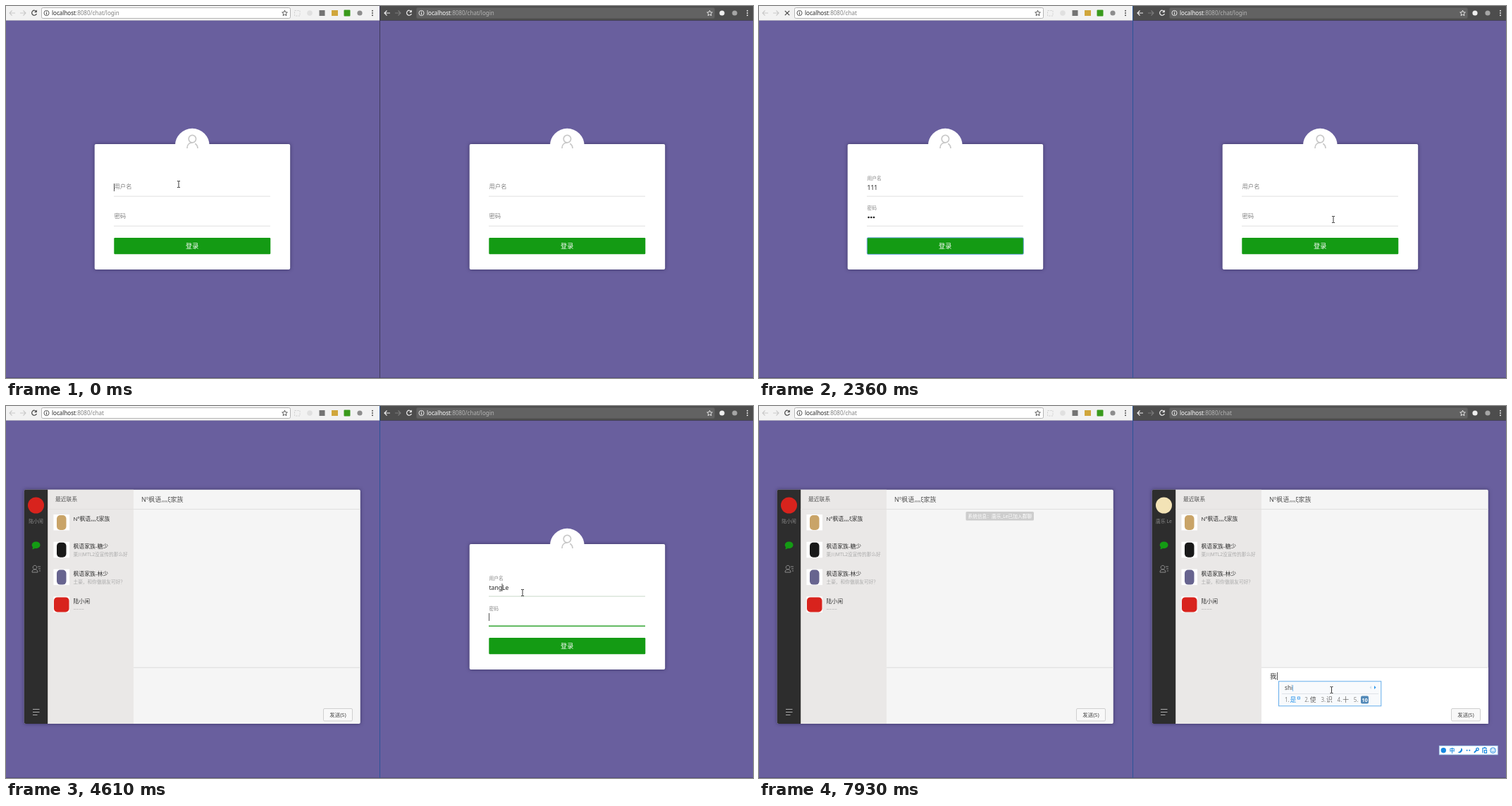
An HTML page for the animation above (8 s loop, 1060x528 px).

```html
<!DOCTYPE html>
<html lang="zh-CN">
<head>
<meta charset="utf-8">
<title>Chat login</title>
<style>
html, body { margin: 0; width: 100%; height: 100%; overflow: hidden; background: #695f9e; }
svg { display: block; width: 1060px; height: 528px; }
text { font-family: "Noto Sans", "Noto Sans CJK SC", "Noto Sans CJK", sans-serif; white-space: pre; }
.lift { filter: drop-shadow(0 0 2.5px rgba(10, 5, 40, .5)); }
</style>
</head>
<body>
<svg id="stage" viewBox="0 0 1060 528"></svg>
<script>
const LOOP = 8000, RIGHT = 532, FADE = 250;
const LEFT_IN = 2460, RIGHT_IN = 6380;
const stage = document.getElementById('stage');
const updates = [];

// --- drawing helpers ---
function add(parent, tag, attrs = {}) {
  const el = document.createElementNS('http://www.w3.org/2000/svg', tag);
  for (const k in attrs) el.setAttribute(k, attrs[k]);
  parent.append(el);
  return el;
}
const group = (p, x = 0, y = 0, attrs = {}) =>
  add(p, 'g', { transform: `translate(${x} ${y})`, ...attrs });
const rect = (p, x, y, width, height, fill, attrs = {}) =>
  add(p, 'rect', { x, y, width, height, fill, ...attrs });
const dot = (p, cx, cy, r, fill, attrs = {}) => add(p, 'circle', { cx, cy, r, fill, ...attrs });
const line = (p, d, stroke, width = 1, attrs = {}) =>
  add(p, 'path', { d, stroke, 'stroke-width': width, fill: 'none', ...attrs });
// y is the middle of the line of text
function label(p, x, y, size, str, fill, attrs = {}) {
  const el = add(p, 'text', { x, y: y + size * .37, 'font-size': size, fill, ...attrs });
  el.textContent = str;
  return el;
}

// --- timing helpers ---
const ease = p => { p = Math.min(1, Math.max(0, p)); return 1 - (1 - p) ** 2.6; };
const at = (steps, t) => steps.reduce((v, s) => s[0] <= t ? s[1] : v, steps[0][1]);
function show(el, ...spans) {
  updates.push(t => {
    el.style.display = spans.some(([a, b = LOOP]) => t >= a && t < b) ? '' : 'none';
  });
  return el;
}
function typed(el, steps) {
  updates.push(t => {
    const s = at(steps, t);
    if (el.textContent !== s) el.textContent = s;
  });
}
function caret(p, y, steps, from, to, color = '#555') {
  const el = show(rect(p, 0, y, 1, 11, color), [from, to]);
  updates.push(t => el.setAttribute('x', at(steps, t)));
}

// --- browser bar ---
function browser(dx, dark, loadFrom, loadTo) {
  const g = group(stage, dx);
  const ink = dark ? '#f2f2f2' : '#444', faint = dark ? '#7c7c7c' : '#c9c9c9';
  rect(g, dark ? -1 : 0, 0, 530, 20, dark ? '#4d4d4d' : '#f2f2f2');
  rect(g, dark ? -1 : 0, 20, 530, 1, dark ? '#45415c' : '#aaa6bb');
  rect(g, 50.5, 2.5, dark ? 423 : 353, 15, dark ? '#626262' : '#fff',
    { rx: 2, stroke: dark ? '#5a5a5a' : '#b4b4b4' });
  line(g, 'M13 10H5M8.5 6.5L5 10l3.5 3.5', dark ? ink : faint, 1.1);
  line(g, 'M20 10h8M24.5 6.5L28 10l-3.5 3.5', faint, 1.1);
  const reload = group(g);
  line(reload, 'M43 7.7A3.5 3.5 0 1 0 43.4 11', ink, 1.2);
  line(reload, 'M43.6 5.8V9h-3.2z', ink, .3, { fill: ink });
  show(reload, [0, loadFrom], [loadTo]);
  show(line(g, 'M36.8 6.8l6.4 6.4M43.2 6.8l-6.4 6.4', ink, 1.2), [loadFrom, loadTo]);
  dot(g, 57.5, 10, 3.6, 'none', { stroke: ink, 'stroke-width': .9 });
  line(g, 'M57.5 7.7v1M57.5 9.5v2.8', ink, 1);
  const url = label(g, 65, 10, 8.05, '', dark ? '#fff' : '#222');
  add(url, 'tspan').textContent = 'localhost';
  const path = add(url, 'tspan', { fill: dark ? '#b4b4b4' : '#808080' });
  typed(path, [[0, ':8080/chat/login'], [loadFrom, ':8080/chat']]);
  const star = group(g, dark ? 466.5 : 395.5, 10);
  line(star, 'M0-3.8L1.1-1.2 3.8-1 1.8.9 2.4 3.6 0 2.2-2.4 3.6-1.8.9-3.8-1-1.1-1.2z', ink, .9);
  if (dark) {
    dot(g, 484, 10, 3.6, '#eee');
    dot(g, 502, 10, 3.6, '#a5a5a5');
  } else {
    rect(g, 409.5, 6.5, 7.5, 7.5, 'none', { stroke: '#d4d4d4', 'stroke-dasharray': '2.5 1.2' });
    dot(g, 431, 10, 3.8, '#e0e0e0');
    rect(g, 444.5, 6, 8, 8, '#747474');
    rect(g, 462, 6, 9, 8, '#d0a63c');
    rect(g, 479.5, 5.5, 9, 9, '#3a9a1c', { rx: 1 });
    dot(g, 502, 10, 3.6, '#8d8d8d');
  }
  [6.7, 10, 13.3].forEach(y => dot(g, 520, y, .95, ink));
}

// --- login form ---
function field(g, y, name, focus, blur) {
  const text = label(g, 0, 0, 8.4, name, '#858585');
  rect(g, 153, y + 14, 222, 1, '#e0e0e0');
  const bar = rect(g, 153, y + 13.8, 222, 1.5, '#149b14');
  updates.push(t => {
    const p = ease((t - focus) / FADE), k = 1 - ease((t - focus) / FADE * 2) * .2;
    text.setAttribute('transform', `translate(153.5 ${y - 11.5 * p}) scale(${k})`);
    bar.setAttribute('opacity', p * p * (1 - ease((t - blur) / FADE)));
  });
}
function login(dx, opt) {
  const g = group(stage, dx);
  show(g, [0, opt.leave]);
  rect(g, 125.7, 196, 277.5, 178, '#fff', { rx: 2, class: 'lift' });
  dot(g, 264.3, 198.2, 24.4, '#fff');
  dot(g, 264.4, 188.6, 5.2, 'none', { stroke: '#c8c8c8', 'stroke-width': 1.7 });
  line(g, 'M257 202C257 197 260 194 264.5 194M268.3 195.3C271 197 272 199 272 202', '#c8c8c8', 1.7);
  field(g, 255.6, '用户名', opt.userFocus, opt.passFocus);
  field(g, 297.8, '密码', opt.passFocus, opt.click);
  typed(label(g, 153.5, 258, 8.6, '', '#222'), opt.user);
  for (let i = 0; i < 3; i++)
    show(dot(g, 155.6 + i * 3.7, 300, 1.35, '#222'), [opt.dots[i]]);
  caret(g, 252, opt.userCaret, ...opt.userCaretOn);
  caret(g, 294, opt.passCaret, opt.passFocus, opt.passCaretOff);
  rect(g, 153.3, 329, 222, 23.2, '#149b14', { rx: 1.2 });
  show(rect(g, 153.3, 328.8, 222, 23.6, 'none', { rx: 1.5, stroke: '#6ea6df' }), [opt.click]);
  label(g, 264.2, 341, 9.1, '登录', '#fff', { 'text-anchor': 'middle' });
}

// --- chat window ---
const GROUP = 'Nº枫语灬ξ家族';
const ROWS = [
  [GROUP, '', '#c9a468'],
  ['枫语家族-糖少', '栗川MTL2没宣传的那么好', '#191919'],
  ['枫语家族-林少', '土豪，和你做朋友可好？', '#67648f'],
  ['陆小闲', '~~~~', '#d8231d']
];
function chat(dx, name, color, from, active) {
  const g = show(group(stage, dx), [from]);
  rect(g, 25.8, 118.8, 477, 332.2, '#f5f5f5', { rx: 2, class: 'lift' });
  rect(g, 25.8, 118.8, 35, 332.2, '#2d2d2d', { rx: 2 });
  rect(g, 59.2, 118.8, 121.8, 332.2, '#eae8e7');
  dot(g, 42.5, 141, 11.5, color);
  label(g, 42.5, 163.8, 6.8, name, '#8c8c8c', { 'text-anchor': 'middle' });
  add(g, 'ellipse', { cx: 42.6, cy: 197.3, rx: 5.9, ry: 4.9, fill: '#149b14' });
  line(g, 'M38 200l-.5 3.5 4-1.5z', 'none', 0, { fill: '#149b14' });
  line(g, 'M41 226.3a2.8 2.8 0 1 1-.1 0M37 236c0-3 1.7-4 4-4s4 1 4 4zM45 228h4M46 231h3M47 234h2', '#8c8c8c', 1);
  line(g, 'M38 430.5h9.5M38 434.5h9.5M38 438.5h6.5', '#aaa');
  label(g, 70, 132.2, 7.8, '最近联系', '#555');
  label(g, 192, 132.5, 9, GROUP, '#555');
  rect(g, 59.2, 146, 122, 1, '#e2e0df');
  rect(g, 181, 146, 322, 1, '#e0e0e0');
  ROWS.forEach(([who, last, tint], i) => {
    const y = 160.5 + i * 38.8, wide = i === 3;
    rect(g, 67.5, y - 6.5, 22.5, 22.5, '#fff');
    rect(g, wide ? 68 : 72, y - 5.5, wide ? 21.5 : 13.5, 21, tint, { rx: 5 });
    label(g, 95.5, y, 7.85, who, '#333');
    label(g, 95.5, y + 11.5, 6.7, last, '#aaa');
  });
  if (active) rect(g, 181, 371, 321.8, 80, '#fff');
  rect(g, 181, 370.7, 321.8, 1, '#dcdcdc');
  rect(g, 450.5, 429.5, 41, 17.5, '#f8f8f8', { rx: 1.5, stroke: '#cfcfcf' });
  label(g, 471, 438.5, 7.4, '发送(S)', '#444', { 'text-anchor': 'middle' });
  return g;
}

// --- input method ---
function toolbar() {
  const g = show(group(stage, 965, 482), [300, 1040], [2820, 4450], [6540]);
  const blue = '#1787e0';
  rect(g, .3, .3, 82.9, 12.6, '#fff', { stroke: '#9fd0f3', 'stroke-width': .8 });
  dot(g, 6.3, 6.8, 3.7, blue);
  typed(label(g, 18.6, 6.8, 7.6, '中', blue, { 'text-anchor': 'middle', 'font-weight': 700 }),
    [[0, '中'], [3120, '英'], [4450, '中']]);
  line(g, 'M31.5 3.3A3.9 3.9 0 1 1 26.5 9.3Q31 9 31.5 3.3z', 'none', 0, { fill: blue });
  dot(g, 39.6, 6.8, 1, blue);
  dot(g, 43.3, 6.8, 1, blue);
  line(g, 'M49.8 10l4-4', blue, 1.8);
  dot(g, 54.5, 5.2, 1.8, 'none', { stroke: blue, 'stroke-width': 1.3 });
  line(g, 'M62 10.5V3.5h5v2M64.5 6.5h3v4h-3zM63.5 2.8h2.5', blue, 1.2);
  dot(g, 76.5, 6.8, 3.8, 'none', { stroke: blue });
  line(g, 'M74.5 7.5q2 2.5 4 0M75 5v1.2M78 5v1.2', blue, .9);
}
function popup(x, from, to, pinyin, words) {
  const g = show(group(stage, x, 390), [from, to]);
  const blue = '#2b95ea';
  rect(g, .5, .8, 145.3, 35, '#f8fafc', { stroke: '#64adeb' });
  const input = label(g, 9, 10, 8.2, '', '#444');
  typed(add(input, 'tspan'), pinyin);
  add(input, 'tspan', { fill: blue, dx: -1.5 }).textContent = '|';
  line(g, 'M132 7l-2.5 2.5 2.5 2.5z', 'none', 0, { fill: '#cfe0ee' });
  line(g, 'M136 7l2.5 2.5-2.5 2.5z', 'none', 0, { fill: blue });
  rect(g, 5, 18, 137, 1, '#dfe3e7');
  for (let i = 0; i < 5; i++) {
    const cx = 9 + (i && 5 + i * 23.2);
    label(g, cx, 27, 8, i + 1 + '.', '#888', { 'font-family': 'Noto Serif, serif' });
    typed(label(g, cx + 7.6, 27, 8.8, '', i ? '#666' : blue, { 'font-weight': 300 }),
      words.map(([t, s]) => [t, s[i] || '']));
  }
  rect(g, 27.5, 23, 3, 3, 'none', { stroke: blue, 'stroke-width': .8 });
  return g;
}

// --- mouse pointer ---
const PATH = [
  [0, 245, 253, 'beam'], [900, 245, 253, 'beam'], [1080, 239, 303, 'beam'],
  [1490, 239, 303, 'beam'], [1640, 264, 341, 'hand'], [1960, 264, 341, 'hand'],
  [2040, 340, 340, 'arrow'], [2140, 500, 335, 'arrow'], [2220, 685, 320, 'beam'],
  [2300, 815, 303, 'beam'], [2480, 815, 303, 'beam'], [2760, 781, 264, 'beam'],
  [2900, 781, 264, 'beam'], [3050, 733, 265, 'beam'], [5400, 733, 265, 'beam'],
  [5740, 771, 343, 'hand'], [RIGHT_IN, 771, 343, 'arrow'],
  [6520, 771, 343, 'arrow'], [6620, 812.5, 403, 'beam']
];
function pointer() {
  const g = group(stage);
  const shapes = { beam: group(g), hand: group(g), arrow: group(g) };
  line(shapes.beam, 'M-2-4.5h1.5l.5.5.5-.5H2M0-4V4M-2 4.5h1.5l.5-.5.5.5H2', '#222', .9);
  line(shapes.hand, 'M-2-5q1.2-1.2 2 0v4l4.5 1.2V4L3 6.5H-1.5L-4.5 1.5q1-1.5 2.5.5z', '#111', .9, { fill: '#fff' });
  line(shapes.arrow, 'M-3-6V4.5l2.5-2.3L1.2 6l1.6-.8L1.2 1.6h3.3z', '#111', .8, { fill: '#fff' });
  updates.push(t => {
    const i = PATH.findLastIndex(p => p[0] <= t), a = PATH[i], b = PATH[i + 1] || a;
    const p = b === a ? 0 : (t - a[0]) / (b[0] - a[0]);
    g.setAttribute('transform', `translate(${a[1] + (b[1] - a[1]) * p} ${a[2] + (b[2] - a[2]) * p})`);
    for (const k in shapes) shapes[k].style.display = k === a[3] ? '' : 'none';
  });
}

// --- scene ---
rect(stage, 0, 0, 1060, 528, '#695f9e');
browser(0, false, 1900, LEFT_IN);
browser(RIGHT, true, 6150, RIGHT_IN);
rect(stage, 0, 527, 1060, 1, '#554d80');
const divider = rect(stage, 530, 0, 1, 528, '#3f3b5c');
updates.push(t => divider.setAttribute('fill', t < 2300 ? '#3f3b5c' : '#2c5496'));

login(0, {
  leave: LEFT_IN, userFocus: 80, passFocus: 1040, click: 1800,
  user: [[0, ''], [640, '1'], [710, '11'], [780, '111']],
  userCaret: [[0, 153], [640, 158.5], [710, 163.5], [780, 168.5]], userCaretOn: [0, 1040],
  dots: [1250, 1420, 1490],
  passCaret: [[0, 153], [1250, 157], [1420, 161], [1490, 165]], passCaretOff: 1800
});
login(RIGHT, {
  leave: RIGHT_IN, userFocus: 2820, passFocus: 4450, click: 6000,
  user: [[0, ''], [3120, 't'], [3200, 'ta'], [3290, 'tan'], [3440, 'tang'], [4060, 'tangL'], [4150, 'tangLe']],
  userCaret: [[0, 153], [3120, 156.5], [3200, 161.5], [3290, 166.5], [3440, 171.5]],
  userCaretOn: [2820, LOOP],
  dots: [5080, 5300, 5380],
  passCaret: [[0, 153]], passCaretOff: LOOP
});

const tip = show(group(stage, 237, 308), [1250, 1490]);
rect(tip, 2, 2, 54, 12, '#000', { opacity: .35 });
rect(tip, -.5, -.5, 54, 12, '#fff', { stroke: '#808080' });
label(tip, 3, 5.7, 6.7, '请填写此字段。', '#575757');

const left = chat(0, '陆小闲', '#d8231d', LEFT_IN, false);
const notice = show(group(left), [RIGHT_IN]);
rect(notice, 293.5, 150, 96.5, 12.5, '#cdcdcd', { rx: 1.5 });
label(notice, 341.8, 156.4, 6.7, '系统信息：唐乐_Le已加入群聊', '#fff',
  { 'text-anchor': 'middle', 'font-weight': 500 });

const right = chat(RIGHT, '唐乐 Le', '#f3e3b6', RIGHT_IN, true);
show(label(right, 193, 384, 9.4, '我', '#333'), [7630]);
caret(right, 378, [[0, 193], [7630, 203]], RIGHT_IN, LOOP);

toolbar();
popup(725, 6620, 7630, [[0, 'w'], [6780, 'wo']],
  [[0, '我为无文玩'], [6780, '我握窝卧沃'], [6920, '我窝握卧沃']]);
const last = popup(737, 7780, LOOP, [[0, 's'], [7850, 'sh'], [7930, 'shi']],
  [[0, '是说上三'], [7850, '是上说谁'], [7930, '是使识十']]);
rect(last, 117, 21.5, 11, 11, '#5289b8', { rx: 2 });
label(last, 122.5, 27, 7.5, '10', '#fff', { 'text-anchor': 'middle', 'font-weight': 700 });
pointer();

const start = performance.now();
function render(now) {
  const t = Math.max(0, now - start) % LOOP;
  for (const update of updates) update(t);
  requestAnimationFrame(render);
}
render(start);
</script>
</body>
</html>
```
